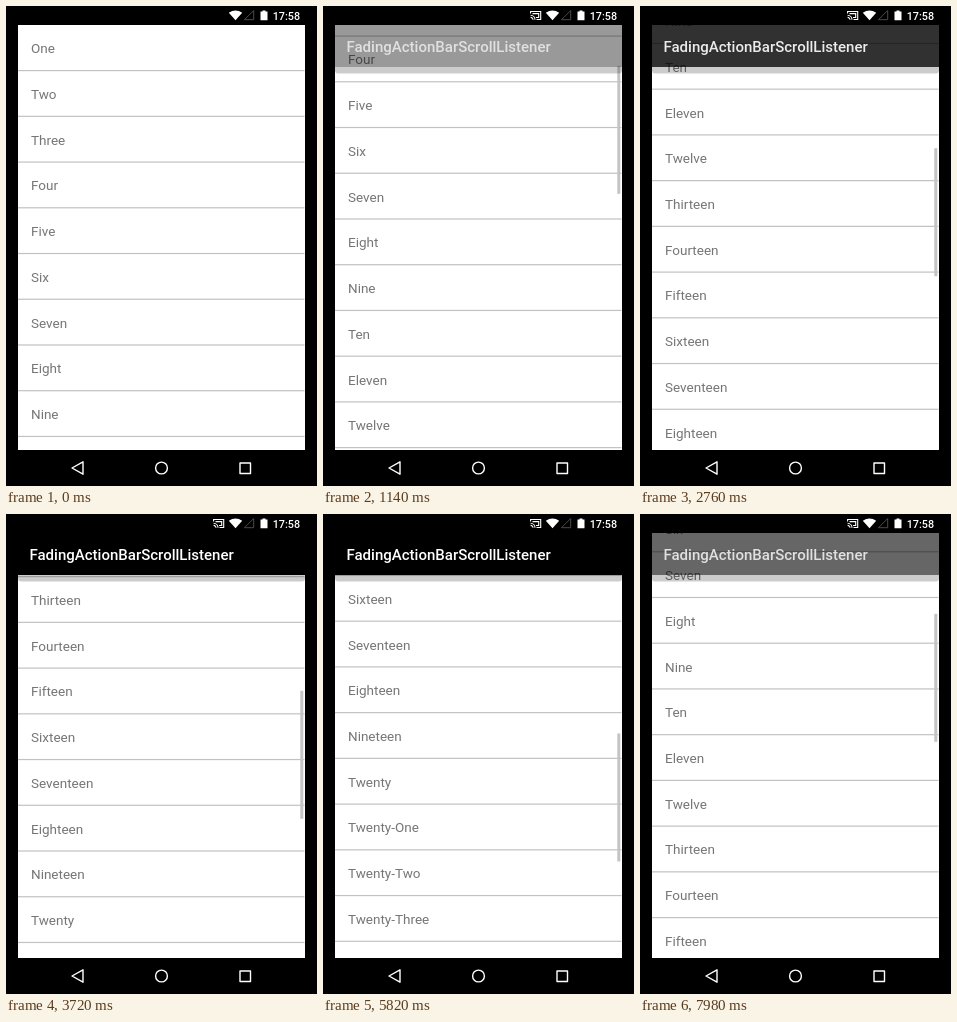
Write an HTML page that moves like this. It is 311 px wide and 480 px high and loops after 8000 ms.

```html
<!DOCTYPE html>
<html lang="en">
<head>
<meta charset="utf-8">
<title>Fading action bar</title>
<style>
  html, body { margin: 0; width: 100%; height: 100%; overflow: hidden; background: #000; }
  svg { display: block; width: 100vw; height: 100vh; }
  text { font-family: Roboto, "Noto Sans", sans-serif; }
  #rows text { font-size: 13.5px; fill: #767676; }
  #rows rect { fill: #c2c2c2; }
  #title { font-size: 15px; font-weight: 500; fill: #fff; }
  #clock { font-size: 10.8px; font-weight: 500; fill: #fff; }
</style>
</head>
<body>
<svg viewBox="0 0 311 480">
  <defs><clipPath id="panel"><rect x="12" y="19" width="287" height="425"/></clipPath></defs>
  <rect width="311" height="480"/>

  <g clip-path="url(#panel)">
    <rect x="12" y="19" width="287" height="425" fill="#fff"/>
    <g id="rows"></g>
    <rect id="thumb" x="294.3" width="3" height="128" fill="#c4c4c4"/>
    <path id="shadow" d="M12 61H299V64.500Q299 67.500 296 67.500H15Q12 67.500 12 64.500Z"/>
    <rect id="bar" x="12" y="19" width="287" height="42"/>
    <text id="title" x="23.500" y="46">FadingActionBarScrollListener</text>
  </g>

  <g id="cast" fill="none" stroke="#fff" stroke-width="1.1">
    <path d="M207.600 7.500V5.500H217.700V13.500H213.500M207.600 9.300A4.500 4.500 0 0 1 212 13.800M207.600 11.400A2.400 2.400 0 0 1 210 13.800"/>
    <path d="M209.500 7.600H215.700V11.500H213"/>
  </g>
  <path d="M222.800 6.800Q229.500 2.400 236.200 6.800L229.500 14.200Z" fill="#fff"/>
  <path d="M238.500 13.700L247.700 4.500V13.700Z" fill="none" stroke="#4a4a4a"/>
  <path d="M254.500 5.500H256.500V4.500H259.500V5.500H261.500V14.300H254.500Z" fill="#fff"/>
  <text id="clock" x="266.700" y="13.500">17:58</text>

  <g fill="none" stroke="#fff" stroke-width="1.4" stroke-linejoin="round">
    <path d="M66 462L77 455.800V468.200Z"/>
    <circle cx="155.500" cy="462" r="5.900"/>
    <rect x="234" y="457" width="10.500" height="10.500"/>
  </g>
</svg>
<script>
  const LOOP = 8000, STEP = 60, ROW = 45.73;
  const byId = id => document.getElementById(id);
  const [rows, thumb, shadow, bar, title, cast] =
    ["rows", "thumb", "shadow", "bar", "title", "cast"].map(byId);

  const words = ("One Two Three Four Five Six Seven Eight Nine Ten Eleven Twelve Thirteen " +
    "Fourteen Fifteen Sixteen Seventeen Eighteen Nineteen Twenty").split(" ");
  const numberName = n => n <= 20 ? words[n - 1] : n === 30 ? "Thirty" : "Twenty-" + words[n - 21];

  // [time in ms, list offset in px]
  const scrollKeys = [[0, 0], [1140, 126], [2760, 393], [3720, 505], [4740, 738], [5040, 764],
    [5220, 764], [6780, 385], [6840, 384], [7080, 384], [7980, 255.5], [8040, 248]];
  // [list offset in px, bar opacity]
  const fadeKeys = [[0, 0], [126, .4], [255, .6], [390, .8], [465, 1]];

  function segment(keys, x) {
    let i = 0;
    while (i < keys.length - 2 && x >= keys[i + 1][0]) i++;
    return i;
  }

  function linear(keys, x) {
    const i = segment(keys, x), [x0, y0] = keys[i], [x1, y1] = keys[i + 1];
    return y0 + (y1 - y0) * Math.min(1, (x - x0) / (x1 - x0));
  }

  const slope = (keys, i) => (keys[i + 1][1] - keys[i][1]) / (keys[i + 1][0] - keys[i][0]);

  function tangent(keys, i) {
    if (i === 0) return slope(keys, 0);
    if (i === keys.length - 1) return slope(keys, i - 1);
    const a = slope(keys, i - 1), b = slope(keys, i);
    return a * b > 0 ? 2 * a * b / (a + b) : 0;
  }

  // Monotone cubic: smooth speed without overshoot at the turning points
  function smooth(keys, x) {
    const i = segment(keys, x), [x0, y0] = keys[i], [x1, y1] = keys[i + 1];
    const h = x1 - x0, u = (x - x0) / h, v = 1 - u;
    return y0 * v * v * (1 + 2 * u) + y1 * u * u * (3 - 2 * u)
      + h * u * v * (tangent(keys, i) * v - tangent(keys, i + 1) * u);
  }

  function add(tag, attrs, content = "") {
    const el = document.createElementNS("http://www.w3.org/2000/svg", tag);
    for (const name in attrs) el.setAttribute(name, attrs[name]);
    el.textContent = content;
    rows.append(el);
  }

  for (let i = 0; i < 30; i++) {
    add("text", { x: 25, y: 47.2 + i * ROW }, numberName(i + 1));
    add("rect", { x: 12, y: 64 + i * ROW, width: 286.5, height: 1.2 });
  }

  function draw(ms) {
    const t = Math.floor(ms % LOOP / STEP) * STEP;
    const offset = smooth(scrollKeys, t);
    const alpha = linear(fadeKeys, offset);
    const shown = t > 0 ? 1 : 0;
    rows.setAttribute("transform", `translate(0 ${-offset})`);
    thumb.setAttribute("y", 21 + .3085 * offset);
    thumb.setAttribute("opacity", shown);
    cast.setAttribute("opacity", shown);
    shadow.setAttribute("opacity", .2 * Math.min(1, alpha * 2.5));
    bar.setAttribute("opacity", alpha);
    title.setAttribute("opacity", Math.min(2 * alpha, .5 + alpha / 2));
  }

  const start = performance.now();
  function tick() {
    draw(performance.now() - start);
    requestAnimationFrame(tick);
  }
  draw(0);
  requestAnimationFrame(tick);
</script>
</body>
</html>
```
